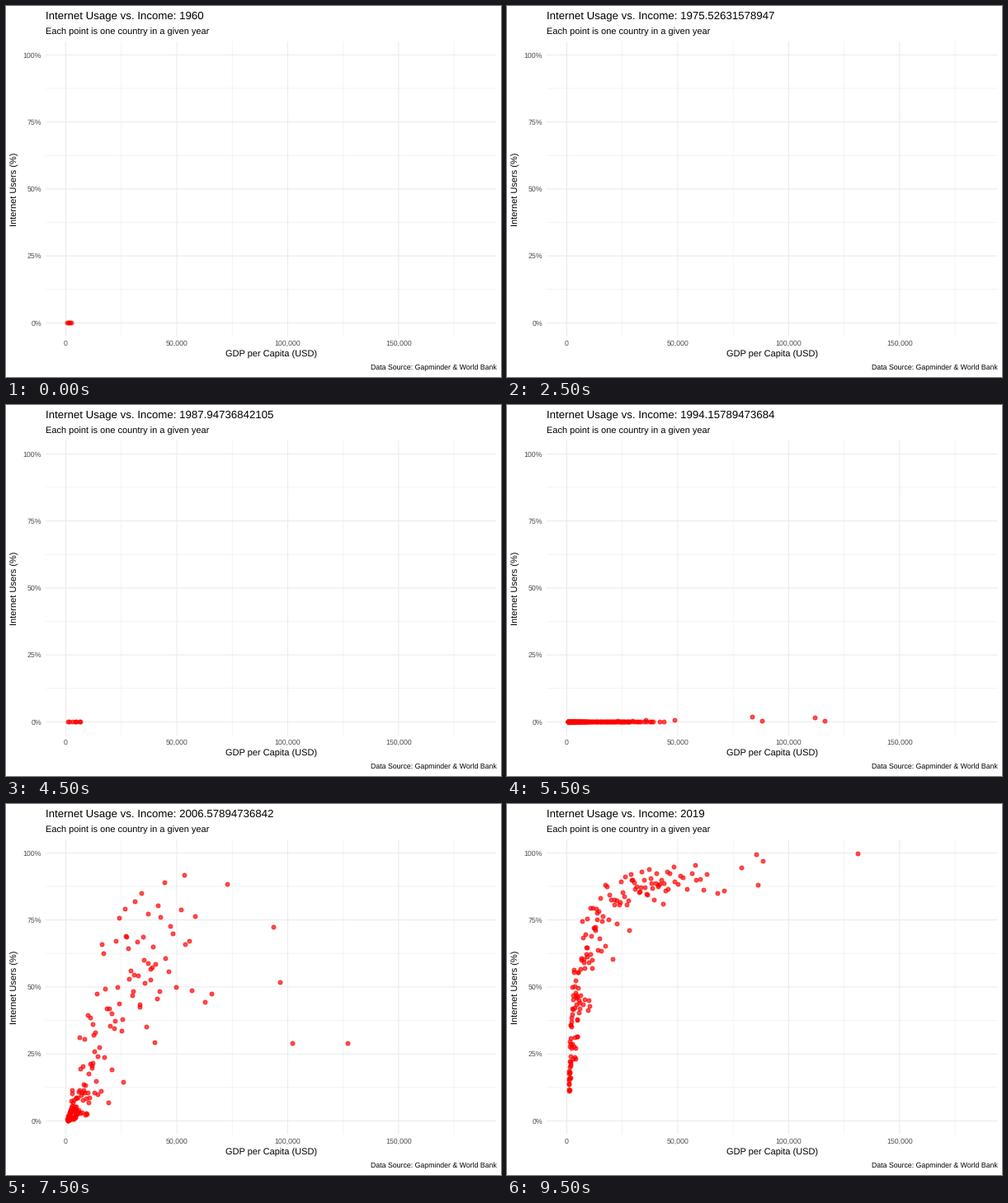
A matplotlib script that plays this animation: 600x450 px, repeating every 10 s.

```python
import matplotlib.pyplot as plt
import numpy as np
from matplotlib.animation import FuncAnimation

plt.rcParams["font.family"] = "Liberation Sans"
plt.rcParams["text.hinting"] = "none"

W, H, FRAMES, COUNTRIES = 600, 450, 20, 170
X0, Y0 = 72.5, 384.4                      # pixel position of the data origin
PX_PER_THOUSAND, PX_PER_PCT = 2.689, 3.251
LEFT, RIGHT, TOP, BOTTOM = 48, 594.5, 43.1, 400.6
GRID = "#EBEBEB"

# Every country keeps its income rank and its lead or lag in adoption
rng = np.random.default_rng(7)
rank = (np.arange(COUNTRIES) + rng.random(COUNTRIES)) / COUNTRIES
lead = np.clip(rng.normal(size=COUNTRIES), -2.2, 1.7)
income = np.interp(rank, [0, 0.15, 0.35, 0.5, 0.6, 0.75, 0.91, 0.98, 1],
                   [0.7, 1.8, 5, 10, 14.7, 29, 44, 60, 75])

# How the world changes between a few key years
KEY_YEARS = [1991.1, 1994.2, 1997.3, 2000.4, 2006.6, 2012.8, 2019]
LOG_HALF = np.log([9000, 1500, 250, 76, 28, 12, 5])    # income with 50% usage
SLOPE = [1.7, 1.7, 1.7, 1.7, 1.55, 1.27, 1]
SPREAD = [0.8, 0.8, 0.8, 0.8, 0.9, 0.6, 0.45]
GROWTH = [0.6, 0.65, 0.7, 0.75, 0.97, 1, 1.05]

# The richest countries: income and usage from 2000 on
RICH_YEARS = KEY_YEARS[3:]
RICHEST = [
    ([107, 127, 132, 131], [4, 29, 69, 99.7]),
    ([103, 102, 126, 88.5], [15, 29, 61, 97]),
    ([77, 93.5, 88, 85.5], [17.5, 72.5, 92, 99.5]),
    ([81, 96.5, 85, 86], [5, 52, 70.5, 88]),
]
EARLY_INCOME = {1960: [0.7, 1.2, 1.5, 2.3], 1988: [1, 1.6, 3.2, 4.2, 4.8, 6.3, 6.6]}


def pixels(thousands, percent):
    return np.column_stack([X0 + np.asarray(thousands) * PX_PER_THOUSAND,
                            Y0 - np.asarray(percent) * PX_PER_PCT])


def offline(incomes, growth):
    return pixels(np.array(incomes) * growth, np.zeros(len(incomes)))


def online(year):
    """Logistic adoption by income, plus the richest few."""
    half, slope, spread, growth = (
        np.interp(year, KEY_YEARS, v) for v in (LOG_HALF, SLOPE, SPREAD, GROWTH))
    usd = income * growth
    logit = slope * (np.log(np.minimum(usd, 50)) - half) + spread * lead
    usage = 100 / (1 + np.exp(-logit))
    takeoff = np.interp(year, [1991, 2000.4], [0, 1]) ** 2
    boom = 1 + 0.085 * np.interp(year, [1994.2, 2000.4], [1, 0])
    rich = [(np.interp(year, RICH_YEARS, g) * boom,
             np.interp(year, RICH_YEARS, u) * takeoff) for g, u in RICHEST]
    return np.vstack([pixels(usd, usage), pixels(*zip(*rich))])


def scene(k, year):
    if k < 3:
        return offline(EARLY_INCOME[1960], 1 + 0.08 * k)
    if k < 6:
        return np.empty((0, 2))
    if k < 10:
        return offline(EARLY_INCOME[1988], 1 - 0.05 * (9 - k))
    return online(year)


fig = plt.figure(figsize=(W / 72, H / 72), dpi=72, facecolor="white")
ax = fig.add_axes([0, 0, 1, 1])
ax.set(xlim=(0, W), ylim=(H, 0))
ax.axis("off")


def label(x, y, text, size, ha="left", color="black", **kw):
    return ax.text(x, y, text, fontsize=size, ha=ha, va="baseline", color=color, **kw)


def line(xs, ys, width):
    ax.plot(xs, ys, color=GRID, lw=width, snap=False, solid_capstyle="butt")


for i in range(8):
    thousands, major = 25 * i, i % 2 == 0
    x = X0 + thousands * PX_PER_THOUSAND
    line([x, x], [TOP, BOTTOM], 1.07 if major else 0.53)
    if major:
        label(x, 412, f"{thousands * 1000:,}", 8.8, "center", "#4D4D4D")
for i in range(9):
    percent, major = 12.5 * i, i % 2 == 0
    y = Y0 - percent * PX_PER_PCT
    line([LEFT, RIGHT], [y, y], 1.07 if major else 0.53)
    if major:
        label(43.2, y + 3.2, f"{percent:.0f}%", 8.8, "right", "#4D4D4D")

title = label(48, 15, "", 13.2)
label(48, 34.6, "Each point is one country in a given year", 11)
label((LEFT + RIGHT) / 2, 425.6, "GDP per Capita (USD)", 11, "center")
label(13.4, (TOP + BOTTOM) / 2, "Internet Users (%)", 11, "center",
      rotation=90, rotation_mode="anchor")
label(RIGHT, 441, "Data Source: Gapminder & World Bank", 8.8, "right")

dots = ax.scatter([], [], s=5**2, facecolor=(1, 0, 0, 0.7), edgecolor=(1, 0, 0, 0.7),
                  linewidth=0.94, zorder=3)


def draw(k):
    year = 1960 + 59 * k / (FRAMES - 1)
    title.set_text(f"Internet Usage vs. Income: {year:.15g}")
    dots.set_offsets(scene(k, year))
    return title, dots


anim = FuncAnimation(fig, draw, frames=FRAMES, interval=500, init_func=lambda: draw(0),
                     repeat=True, repeat_delay=0, blit=False)
plt.show()
```
